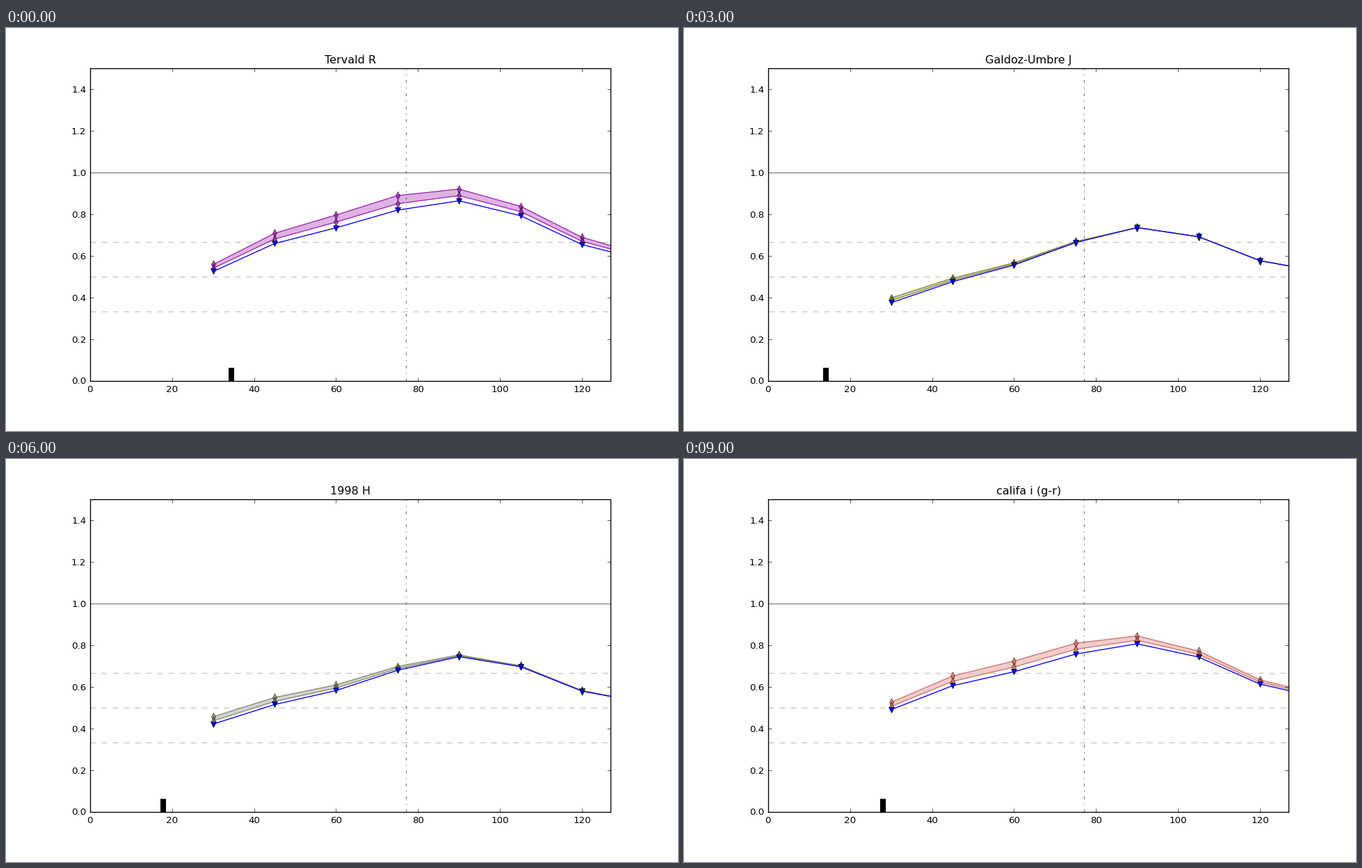
A matplotlib script for the animation above (10 s loop, 966x580 px).

```python
import numpy as np
import matplotlib.pyplot as plt
from matplotlib.animation import FuncAnimation

DPI = 96
plt.rcParams.update({
    "font.family": "DejaVu Sans",
    "font.size": 10,
    "axes.linewidth": 1.0,
    "lines.linewidth": 1.0,
    "lines.markersize": 6,
    "lines.markeredgewidth": 0.5,
    "lines.scale_dashes": False,
})

# Lower curve for the shortest and the longest scale length
X = np.array([30, 45, 60, 75, 90, 105, 120, 127])
SHORT, LONG = 14.07, 42.96
LOW_SHORT = np.array([.374, .475, .555, .663, .735, .691, .576, .551])
LOW_LONG = np.array([.566, .728, .822, .914, .959, .881, .733, .693])
GAP_SHORT = np.clip(.023 - .0004 * (X - 30), 0, None)
GAP_LONG = np.interp(X, [30, 75, 127], [.029, .091, .049])

# Title, scale length, colour
SCENES = [
    ("Tervald R", 34.4, (148, 5, 165)),
    ("Tervald B", 32.45, (148, 198, 119)),
    ("1998 R", 37.5, (120, 110, 140)),
    ("Galdoz-Umbre J", SHORT, (119, 119, 34)),
    ("1991 R", LONG, (105, 84, 41)),
    ("1998 V", 40.65, (91, 55, 76)),
    ("1998 H", 17.86, (110, 120, 90)),
    ("califa g (r-i)", 28.2, (24, 30, 50)),
    ("califa r (g-i)", 28.1, (120, 90, 80)),
    ("califa i (g-r)", 28.03, (205, 91, 84)),
]


def mix(a, b, t):
    return a + (b - a) * t


def curves(scale):
    """Low, middle and high curve; outer points respond later to scale."""
    t = (scale - SHORT) / (LONG - SHORT)
    low = mix(LOW_SHORT, LOW_LONG, t ** (.70 + .0146 * (X - 30)))
    high = mix(LOW_SHORT + GAP_SHORT, LOW_LONG + GAP_LONG,
               t ** (.60 + .0134 * (X - 30)))
    return low, mix(low, high, .44), high


fig = plt.figure(figsize=(966 / DPI, 580 / DPI), dpi=DPI, facecolor="white")
ax = fig.add_axes([.125, .125, .775, .775])
ax.set_xlim(0, 127)
ax.set_ylim(0, 1.5)
ax.set_xticks(range(0, 121, 20))
ax.set_yticks(np.arange(0, 1.5, .2))
ax.yaxis.set_major_formatter("{x:.1f}")
ax.tick_params(direction="in", length=4, width=.5, top=True, right=True)
ax.tick_params(axis="x", pad=5)
ax.tick_params(axis="y", pad=4)

ax.axhline(1, color="0.5")
for level in (1 / 3, 1 / 2, 2 / 3):
    ax.axhline(level, color="0.78", dashes=(6, 6))
ax.axvline(77, color="0.5", dashes=(3, 5, 1, 5))

title = ax.set_title(" ", fontsize=12, pad=5, y=1.0)
bar, = ax.plot([0, 0], [0, .0617], "k", lw=6, solid_capstyle="butt")
fill, = ax.fill([0, 1, 1], [0, 0, 1], lw=1, alpha=.3)


def curve(style, **kw):
    return ax.plot(X, X * 0, style, mec="k", markevery=slice(0, 7), **kw)[0]


upper = curve("d-", alpha=.7)
middle = curve("d-", alpha=.7)
lower = curve("v-", color="b")


def update(i):
    name, scale, rgb = SCENES[i]
    color = tuple(c / 255 for c in rgb)
    low, mid, high = curves(scale)
    title.set_text(name)
    bar.set_xdata([scale, scale])
    for line, y in ((upper, high), (middle, mid)):
        line.set_ydata(y)
        line.set_color(color)
        line.set_markerfacecolor(color)
    lower.set_ydata(low)
    fill.set_xy(np.column_stack([np.r_[X, X[::-1]], np.r_[high, mid[::-1]]]))
    fill.set_color(color)
    return title, bar, fill, upper, middle, lower


anim = FuncAnimation(fig, update, frames=len(SCENES), interval=1000,
                     repeat=True, repeat_delay=0, blit=False)
plt.show()
```
